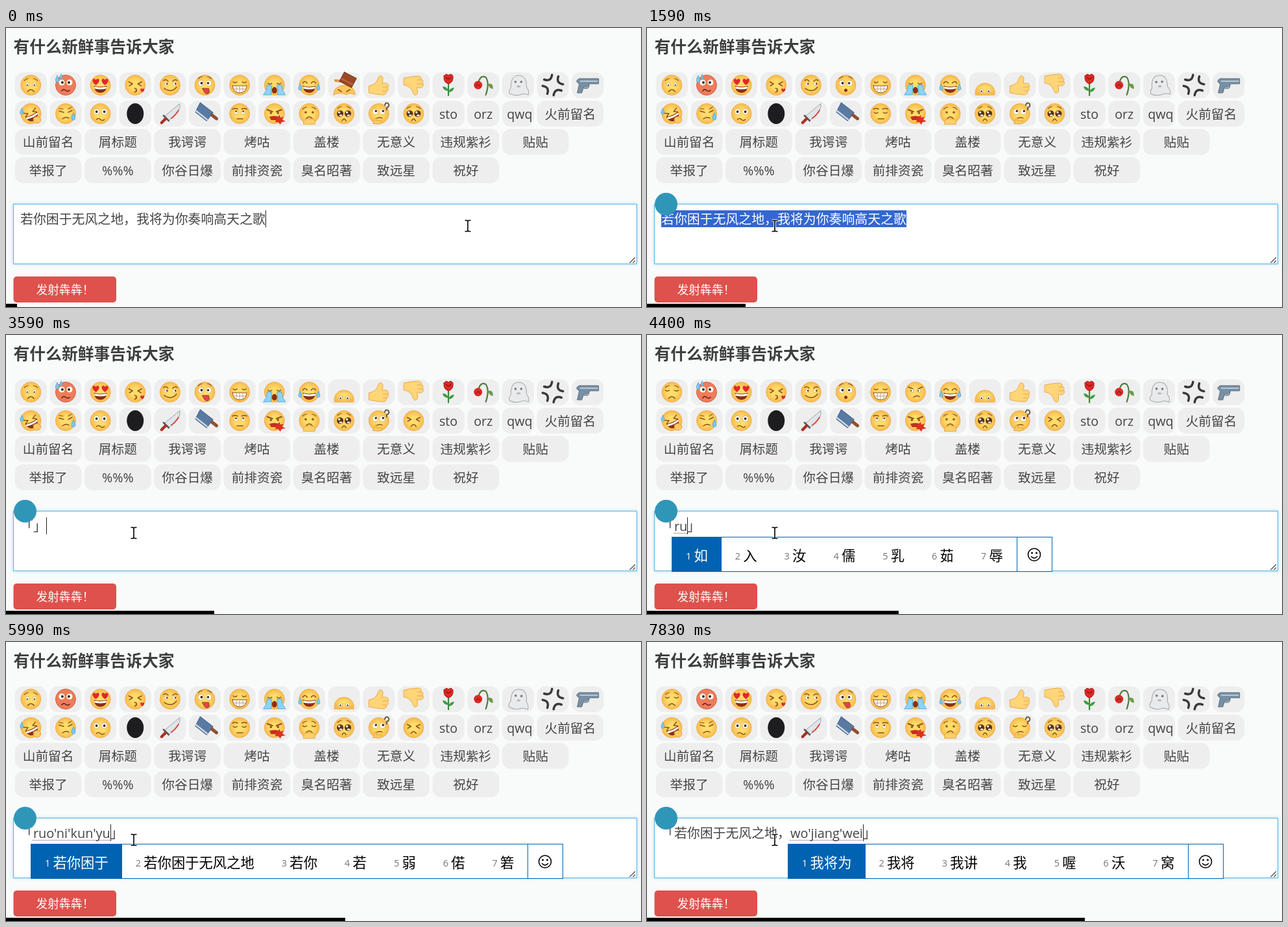
These frames come from a looping animation (979x430 px, 8000 ms). An HTML page:

```html
<!DOCTYPE html>
<html lang="zh-CN">
<head>
<meta charset="utf-8">
<style>
  html, body { margin: 0; width: 100%; height: 100%; overflow: hidden; background: #f9fbfb; }
  #stage { position: absolute; left: 0; top: 0; width: 979px; height: 430px; overflow: hidden;
    font-family: "Open Sans", "Noto Sans CJK SC", "Noto Sans CJK", sans-serif; color: #444; text-spacing-trim: space-all; }
  #stage > * { position: absolute; box-sizing: border-box; }
  svg { left: 0; top: 0; overflow: visible; }
  #box { left: 11px; top: 271px; width: 962px; height: 93px; background: #fff;
    border: 1px solid #5ab5e0; box-shadow: 0 0 5px #a9d8f0; }
  #line { left: 22px; top: 281px; font-size: 19.9px; line-height: 26px; white-space: pre; }
  #line span { position: relative; top: 1px; }
  #line u { text-decoration: underline dotted 1px #555; text-underline-offset: 3px; text-decoration-skip-ink: none; }
  #line mark { background: #3367d1; color: #fff; display: inline-block; height: 26px; vertical-align: top; }
  #line i { display: inline-block; width: 1px; height: 26px; margin-right: -1px; vertical-align: top; background: #222; }
  #badge { left: 12px; top: 254px; width: 35px; height: 35px; border-radius: 50%; background: #3096b8; }
  #popup { top: 311px; height: 54px; display: flex; border: 1px solid #0063b1; background: #fff; color: #000;
    font: 21.33px/54px "Noto Sans CJK SC", "Noto Sans CJK", sans-serif; white-space: pre; }
  #popup span { display: flex; padding: 0 21px; }
  #popup span:first-child { background: #0063b1; color: #fff; }
  #popup small { width: 12.5px; font: 14.5px/57px "Open Sans", sans-serif; color: #767676; }
  #popup span:first-child small { color: #fff; }
  #popup b { min-width: 21.33px; font-weight: 400; text-align: center; }
  #popup svg { position: static; width: 54px; height: 52px; box-sizing: border-box; border-left: 1px solid #0063b1; }
  #bar { left: 0; top: 425px; height: 5px; background: #000; }
</style>
</head>
<body>
<div id="stage">
  <svg width="979" height="430">
    <defs><radialGradient id="skin"><stop offset=".4" stop-color="#ffdc6b"/><stop offset="1" stop-color="#f8bb4c"/></radialGradient></defs>
    <text x="11.5" y="37.5" font-size="24.8" font-weight="700" fill="#3e3e3e">有什么新鲜事告诉大家</text>
    <g id="chips" font-size="19.7" text-anchor="middle" fill="#444"></g>
    <g id="emoji"></g>
    <rect x="11.5" y="383" width="158.5" height="40" rx="5" fill="#de514c"/>
    <text x="91" y="410" font-size="17.8" text-anchor="middle" fill="#fff">发射犇犇！</text>
  </svg>
  <div id="box"></div>
  <svg width="979" height="430"><path d="M961.5 362L970 353.5M966.5 362L970 358.5" stroke="#555" stroke-width="1.3"/></svg>
  <div id="line"></div>
  <div id="badge"></div>
  <div id="popup"></div>
  <svg id="mouse" width="10" height="20" fill="none">
    <defs><path id="beam" d="M-4.5-8.5H-1.5L0-7.5 1.5-8.500H4.5M0-7.5V7.5M-4.5 8.500H-1.5L0 7.5 1.5 8.500H4.5"/></defs>
    <use href="#beam" stroke="#fff" stroke-width="3.5"/><use href="#beam" stroke="#000" stroke-width="1.6"/>
  </svg>
  <div id="bar"></div>
</div>
<script>
const $ = id => document.getElementById(id);
const pitch = 53.65;

// Chips
const chip = (x, y, w, label = '') =>
  `<rect x="${x}" y="${y}" width="${w}" height="40" rx="13" fill="#eee"/><text x="${x + w / 2}" y="${y + 27.5}">${label}</text>`;
let chips = '';
for (let k = 0; k < 17; k++) chips += chip(13.7 + pitch * k, 68.3, 49.2);
for (let k = 0; k < 12; k++) chips += chip(13.7 + pitch * k, 112, 49.2);
['sto', 'orz', '\u00a0qwq'].forEach((s, k) => chips += chip(13.7 + pitch * (12 + k), 112, 49.2, s));
chips += chip(13.7 + pitch * 15, 112, 102.8, '火前留名');
['山前留名 屑标题 我谔谔 烤咕 盖楼 无意义 违规紫衫 贴贴', '举报了 %%% 你谷日爆 前排资瓷 臭名昭著 致远星 祝好'].forEach((row, r) =>
  row.split(' ').forEach((s, k) => chips += chip(13.7 + 2 * pitch * k, 155.6 + 43.6 * r, 102.8, s)));
$('chips').innerHTML = chips;

// Drawing helpers, centred on 0,0
const ink = '#8a5218';
const P = (d, stroke = ink, w = 1.5, fill = 'none') =>
  `<path d="${d}" stroke="${stroke}" stroke-width="${w}" fill="${fill}" stroke-linecap="round" stroke-linejoin="round"/>`;
const fill = (d, color, edge = 'none') => P(d, edge, 1, color);
const O = (x, y, r, color, ry = r) => `<ellipse cx="${x}" cy="${y}" rx="${r}" ry="${ry}" fill="${color}"/>`;
const face = (inner, color = 'url(#skin)', edge = '#eeb052') =>
  `<circle r="15.5" fill="${color}" stroke="${edge}"/>` + inner;
const turn = (deg, s) => `<g transform="rotate(${deg})">${s}</g>`;
const move = (x, y, s, size = 1) => `<g transform="translate(${x} ${y}) scale(${size})">${s}</g>`;
const eye = (x, y, r, dx = 0, dy = 0) => O(x, y, r + .5, '#c48a3a') + O(x, y, r, '#fff') + O(x + dx, y + dy, r * .45, '#3b2411');
const eyes = (y, r, dx, dy) => eye(-5.5, y, r, dx, dy) + eye(5.5, y, r, dx, dy);
const dots = (y, r = 1.8) => O(-5.5, y, r, ink) + O(5.5, y, r, ink);
const brows = y => P(`M-10 ${y + 2}Q-7 ${y - 1} -4 ${y - 1}M10 ${y + 2}Q7 ${y - 1} 4 ${y - 1}`, ink, 1.2);
const shut = y => P(`M-10 ${y}Q-7 ${y + 3} -4 ${y}M4 ${y}Q7 ${y + 3} 10 ${y}`);
const squint = P('M-10 -5L-4 -2 -9 1M10 -5L4 -2 9 1');
const frown = (y, w = 5) => P(`M${-w} ${y + 2}Q0 ${y - 4} ${w} ${y + 2}`);
const teeth = P('M-8 4Q0 6 8 4', '#fff', 3);
const grin = fill('M-10 1Q0 4 10 1Q9 12 0 12Q-9 12 -10 1Z', '#8c2f16') + teeth;
const drop = (x, y, s = 1) => fill(`M${x} ${y - 5 * s}q${5 * s} ${8 * s} 0 ${9 * s}q${-5 * s} ${-1 * s} 0 ${-9 * s}Z`, '#7ccaf0', '#55aede');
const heart = (x, y, s = 1) => move(x, y, fill('M0 5c-9 -6 -4 -13 0 -8c4 -5 9 2 0 8Z', '#e3262e'), s);
const streams = fill('M-11 0H-4L-5 15H-17Q-11 8 -11 0ZM11 0H4L5 15H17Q11 8 11 0Z', '#8ed3f5', '#4fb0e2');
const wetEye = x => O(x, 0, 5.3, '#c48a3a') + O(x, 0, 4.8, '#5a3014') + O(x - 1.5, -2, 1.7, '#fff') + O(x + 1, 2.7, 2.4, '#e8f4fb', 1.5);
const plead = wetEye(-6) + wetEye(6) + brows(-10) + frown(9, 3);
const thumb = fill('M-15 1Q-6 0 -2 -8Q0 -16 4 -14Q8 -12 5 -3L12 -3Q17 0 14 4Q16 8 12 10Q12 15 6 15L-4 14L-15 12Z', '#fed577', '#eaa84c')
  + P('M6 3H13M6 9H12', '#eaa84c', 1.2);

const rowOne = [
  i => face(brows(-9) + frown(8) + (i % 17 > 3 && i % 17 < 7 ? shut(-3) : eyes(-1, 2.5, 0, .8))),
  i => face(eye(-6, -4, 4.5, 1) + eye(6, -4, 4.5, -1) + P('M-6 9Q-3 5 0 8T6 8', '#5d1c10') +
    (i < 26 ? drop(-13, -9, 1.1) + drop(-7, -13, .7) : ''), '#ee7c5c', '#d0603f'),
  () => face(grin + heart(-7, -5) + heart(7, -5)),
  () => face(squint + P('M-1 5Q4 6 1 8Q4 9 -1 11') + heart(11, 8, .6)),
  () => face(P('M-10 -7Q-6 -10 -3 -6M4 -6Q8 -10 11 -7') + eye(-6, -2, 2.6, 1.2) + eye(7, -2, 2.6, 1.2) + P('M-9 5Q2 13 10 3')),
  i => face(eye(-6, -3, 4.3, 1) + eye(6, -3, 4, -1) + brows(-12) +
    (i % 14 === 8 ? O(0, 8, 2.5, '#8c2f16') : fill('M-4 5H6L7 11Q4 16 0 12Z', '#e8404c', ink))),
  () => face(shut(-5) + fill('M-11 1H11Q10 12 0 12Q-10 12 -11 1Z', '#fff', ink) + P('M-10 6H10M-5 2V10M0 2V11M5 2V10', '#b58b5b', .8)),
  i => face(i % 20 > 0 && i % 20 < 4
    ? P('M-11 -8L-4 -5M11 -8L4 -5') + eyes(-2, 2.4, -1, 0) + P('M-3 8Q2 4 6 7')
    : shut(-3) + streams + O(0, 8, 4, '#8c2f16', 5)),
  () => face(P('M-10 -3Q-7 -8 -3 -3M3 -3Q7 -8 10 -3') + grin + drop(-14, 4) + drop(14, 4)),
  i => i % 40 < 2
    ? fill('M-16 15Q-17 2 0 0Q18 2 17 15Q8 11 4 15Q-6 10 -16 15Z', '#fcc75a', '#eaa84c') + P('M-9 7L-4 10M9 7L4 10') +
      turn(28, P('M0 -6L-15 0', '#d89750', 4) + fill('M-9 -18H12V-2H-9Z', '#9c4a25', '#6d2f15') + P('M-8 -7H11', '#c0693b', 2))
    : fill('M-15 15C-18 -9 18 -9 15 15Z', 'url(#skin)', '#eeb052') + eyes(9, 2.8, 0, .6),
  () => thumb,
  i => move(0, i % 11 < 3 ? 1 : -2, `<g transform="scale(1 -1)">${thumb}</g>`),
  () => P('M0 -4V16', '#3a8a3d', 2.2) + fill('M0 9Q-8 9 -9 2Q-2 2 0 9ZM0 11Q7 11 9 4Q2 4 0 11Z', '#3f9b42') +
    fill('M-7 -14Q-3 -19 0 -15Q4 -19 7 -14Q8 -4 0 -2Q-8 -4 -7 -14Z', '#dd2a26', '#a51616') + P('M-4 -12Q0 -7 4 -12', '#99120f', 1.3),
  () => P('M4 15Q10 -3 4 -12Q-4 -16 -7 -5', '#4d7f3c', 2.2) + fill('M7 -2Q16 -4 15 6Q9 5 7 -2Z', '#6d9a4a') +
    O(-8, 0, 6.5, '#d92b28') + P('M-11 2Q-8 -4 -5 2', '#98130f', 1.2),
  i => turn(5 * Math.sin(i * .7), fill('M-13 13Q-15 9 -11 4Q-12 -15 1 -15Q14 -15 13 3Q18 9 16 15Q8 12 3 15Q-6 17 -13 13Z', '#e9eaeb', '#a2a5a8')
    + O(-4, -5, 1.8, '#777') + O(5, -5, 1.8, '#777') + O(1, 2, 3, '#b5b5b5', 1.5)),
  () => turn(14, [0, 90, 180, 270].map(a => turn(a, P('M-15 -5Q-4 -4 -5 -15', '#3a3a3a', 3.5))).join('')),
  () => fill('M-17 -6Q-15 -11 -9 -10H17V-2H3L-1 3H-6L-9 12H-16L-13 -1Z', '#7890a4', '#566e82') + P('M-11 -6H15', '#b7c8d5', 2) +
    P('M2 -1Q3 6 -5 5', '#566e82', 1.5)
];

const rowTwo = [
  () => turn(-24, face(squint + grin)) + drop(-14, -3) + fill('M4 7Q10 2 15 7Q17 14 9 15Q3 14 4 7Z', '#fdca62', '#e3a043'),
  i => face(P('M-10 -4L-3 -2M4 -2L10 -5') + P('M-10 -8L-4 -7M4 -7L9 -10', ink, 1.2) + P('M-5 8Q1 4 5 7') + (i < 33 ? drop(12, 5, 1.2) : '')),
  i => face(eye(-6, -3, 4.2) + eye(6, -3, 4.2) + P('M-6 9Q-3 6 0 9T6 9') + (i % 21 > 12 && i % 21 < 16 ? drop(-12, -8) + drop(12, 5) : '')),
  () => O(0, 0, 13, '#1d1d1f', 16),
  () => fill('M15 -15Q18 -4 -2 11L-9 5Z', '#dfe5e8', '#98a3a9') + P('M13 -5Q8 3 2 7', '#d6483f', 2) + P('M-10 3L-2 11', '#54585c', 2.5) + P('M-7 8L-13 14', '#a73122', 4.5),
  () => turn(38, fill('M-16 -9H9V7H-13Z', '#5a79a3', '#40608a') + P('M-14 5H8', '#cfdbe7', 2.5) + P('M10 -5H19', '#8e5030', 5)),
  i => face(P('M-11 -7Q-7 -9 -3 -7M3 -7Q7 -9 11 -7') + (i % 22 > 6 && i % 22 < 10 ? shut(-2) : eyes(-2, 2.6, 0, -1.3)) + P('M-4 8H5')),
  () => face(P('M-11 -6L-3 -3M11 -6L3 -3', ink, 2) + dots(-1) + fill('M-8 5Q0 2 7 5L5 10H-5Z', '#c92f21') +
    fill('M4 6L8 2 9 6 14 5 12 9 17 12 11 13 9 17 6 13 1 13Z', '#dc3022')),
  i => face(brows(-9) + (i > 28 && i < 32 ? shut(-3) : dots(-2)) + frown(6)) + fill('M-9 16Q-10 7 0 8Q11 7 9 16Z', '#fdd066', '#e8a748'),
  () => face(plead),
  i => face((i > 37 ? shut(-3) : eyes(-3, 4, 1, -1)) + P('M-3 7Q2 5 5 7')) + P('M9 -13Q11 -19 15 -15Q17 -11 12 -9V-6', '#6b5a42', 2) +
    fill('M-9 15L-5 6Q-2 8 -4 11L4 11Q7 14 1 16Z', '#fdca62', '#e3a043'),
  i => face(i < 11 || i > 37 ? plead : i > 32 ? plead + drop(-9, 8, 1.1) + drop(9, 8, 1.1) : squint + frown(7, 4))
];

const drawRow = (row, y, step) => row.map((draw, k) => move(38.3 + pitch * k, y, draw(step))).join('');

// Typing: first step, committed text, composition, text after caret, candidates
const verse = '若你困于无风之地，', whole = verse + '我将为你奏响高天之歌';
const script = [
  [11, '', '', '', ''],
  [13, '', 'd', '', '的 到 大 都 但 对 等'],
  [14, '', "d'y", '', '大于 对于 电影 = > 都有 定义'],
  [15, '', "d'y'h", '', '单引号 「」 第一行 电影 的 大 都'],
  [17, '「」', '', '', ''],
  [19, '「', '', '」', ''],
  [21, '「', 'r', '」', '人 让 如 日 热 软 然'],
  [22, '「', 'ru', '」', '如 入 汝 儒 乳 茹 辱'],
  [23, '「', 'ruo', '」', '若 弱 偌 箬 如 入 汝'],
  [24, '「', "ruo'n", '」', '若你 若能 若 弱 偌 箬 如'],
  [25, '「', "ruo'ni", '」', '若你 若 弱 偌 箬 如 入'],
  [26, '「', "ruo'ni'k", '」', '若你看 若你 若 弱 偌 箬 如'],
  [28, '「', "ruo'ni'kun", '」', '若你困 若你困于 若你 若 弱 偌 箬'],
  [29, '「', "ruo'ni'kun'y", '」', '若你困于 若你 若 弱 偌 箬 如'],
  [30, '「', "ruo'ni'kun'yu", '」', '若你困于 若你困于无风之地 若你 若 弱 偌 箬'],
  [31, '「', "ruo'ni'kun'yu'wu", '」', '若你困于无 若你困于无风之地 若你困于 若你 若 弱 偌'],
  [32, '「', "ruo'ni'kun'yu'wu'feng", '」', '若你困于无风 若你困于无风之地 若你 若 弱 偌 箬'],
  [33, '「', "ruo'ni'kun'yu'wu'feng'zhi'di", '」', '若你困于无风之地 若你困于 若你 若 弱 偌 箬'],
  [34, '「' + verse, '', '」', ''],
  [35, '「' + verse, 'wo', '」', '我 喔 沃 窝 握 卧 倭'],
  [36, '「' + verse, "wo'j", '」', '我就 我觉得 我家 我将 我今天 我 喔'],
  [37, '「' + verse, "wo'ji", '」', '我及 我级 我记 我 喔 沃 窝'],
  [38, '「' + verse, "wo'jiang", '」', '我将 我讲 我 喔 沃 窝 握'],
  [39, '「' + verse, "wo'jiang'wei", '」', '我将为 我将 我讲 我 喔 沃 窝']
];
const smiley = '<svg viewBox="0 0 54 52"><g fill="none" stroke="#000" stroke-width="1.6"><circle cx="26.5" cy="26.5" r="9.7"/><path d="M21.5 29Q26.5 35 31.5 29"/></g><circle cx="23" cy="24" r="1.5"/><circle cx="30" cy="24" r="1.5"/></svg>';
const mouseX = [712, 570, 403, 300, 160, 60, 4, 110, 197];

function showText(step) {
  if (step < 11) {
    const kept = step < 3 ? 19 : step > 6 ? 0 : Math.max(0, Math.round((mouseX[step] - 22) / 19.9));
    $('line').innerHTML = `<span>${whole.slice(0, kept)}</span>` +
      (kept < 19 ? `<mark><span>${whole.slice(kept)}</span></mark>` : '<i></i>');
    $('popup').style.display = 'none';
    return;
  }
  const [, before, typing, after, words] = script.findLast(s => s[0] <= step);
  $('line').innerHTML = `<span>${before}<u>${typing}</u></span><i></i><span>${after}</span>`;
  $('popup').style.display = words ? 'flex' : 'none';
  $('popup').style.left = 18 + 19.9 * before.length + 'px';
  $('popup').innerHTML = words.split(' ').map((w, k) => `<span><small>${k + 1}</small><b>${w}</b></span>`).join('') + smiley;
}

function show(step) {
  $('emoji').innerHTML = drawRow(rowOne, 88, step) + drawRow(rowTwo, 132, step);
  showText(step);
  $('badge').style.display = step < 7 ? 'none' : 'block';
  $('mouse').style.left = mouseX[Math.min(step, 8)] + 'px';
  $('mouse').style.top = (step > 1 && step < 7 ? 298 : 305) + 'px';
  $('bar').style.width = 979 / 58 * (step + 1) + 'px';
}

let last = -1;
function tick() {
  let t = performance.now() % 8000;
  if (t >= 7190) t = Math.max(7189, t - 40);
  const step = Math.floor((t + 10) / 200);
  if (step !== last) show(last = step);
  requestAnimationFrame(tick);
}
tick();
</script>
</body>
</html>
```
